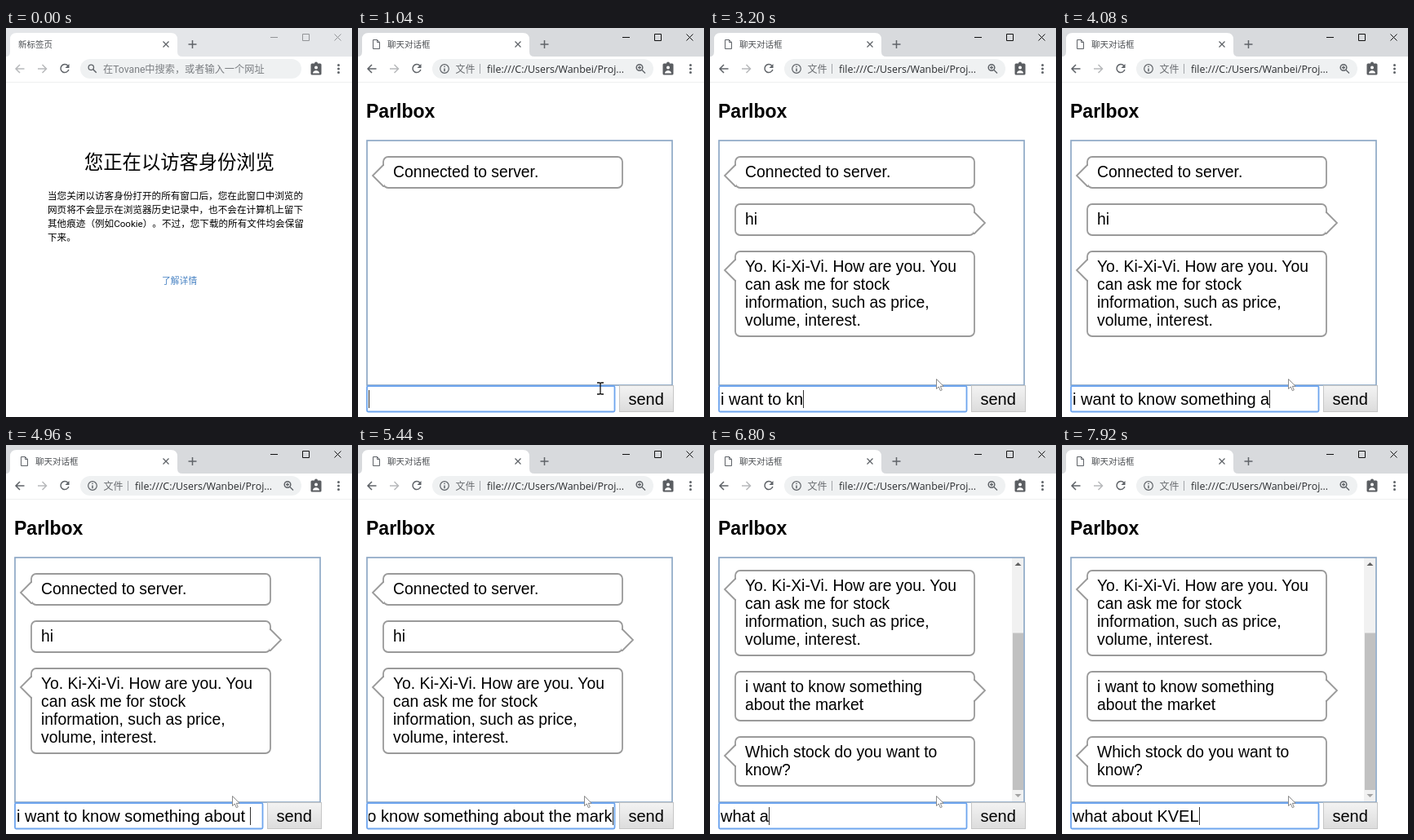
An HTML page for the animation above (8000 ms loop, 424x477 px).

```html
<!DOCTYPE html>
<html lang="zh-CN">
<head>
<meta charset="utf-8">
<title>聊天对话框</title>
<style>
html, body { margin: 0; width: 100%; height: 100%; overflow: hidden; background: #fff; }
svg { position: absolute; left: 0; top: 0; display: block; }
text { white-space: pre; text-spacing-trim: space-all; }
.cjk { font-family: Roboto, "Noto Sans CJK SC", "Noto Sans CJK", sans-serif; }
.arial { font-family: "Liberation Sans", Arial, sans-serif; }
.line { fill: none; stroke: #5f6368; stroke-width: 1.5; }
.off { opacity: .45; }
.bubble rect, .bubble path { fill: #fff; stroke: #9a9a9a; stroke-width: 1.8; }
.bubble text { font-size: 19.33px; }
#field {
  position: absolute; left: 13px; top: 444px; width: 300px; height: 23px;
  overflow: hidden; white-space: pre; font-size: 20px; line-height: 23px; color: #000;
}
#caret { display: inline-block; width: 1px; height: 22px; margin-right: -1px; background: #333; vertical-align: top; }
</style>
</head>
<body>
<svg width="424" height="477" viewBox="0 0 424 477">
  <defs>
    <linearGradient id="face" x2="0" y2="1">
      <stop stop-color="#f3f3f3"/><stop offset="1" stop-color="#dcdcdc"/>
    </linearGradient>
    <clipPath id="view"><rect x="12" y="139" width="372" height="298"/></clipPath>
  </defs>

  <!-- window frame -->
  <rect id="bar" width="424" height="35"/>
  <path d="M0 35Q5 35 5 29V14Q5 6 13 6H202Q210 6 210 14V29Q210 35 216 35Z" fill="#fff"/>
  <path class="line" d="M192.5 16.5l7 7m0-7l-7 7" style="stroke-width:1.3"/>
  <path class="line" d="M223.5 20h10m-5-5v10"/>
  <path id="buttons" d="M324 11.5h9M363.5 7.5h8v8h-8zM402.5 7.5l8 8m0-8l-8 8" fill="none"/>
  <path d="M0 66.5H424" stroke="#eeeff0"/>
  <path id="back" class="line" d="M22.5 50H12m5-5l-5 5l5 5"/>
  <path class="line off" d="M39 50h10.5m-5-5l5 5l-5 5"/>
  <path class="line" d="M75.8 46.3A5 5 0 1 0 76.8 51"/>
  <path d="M77.5 44v5h-5z" fill="#5f6368"/>
  <rect x="91" y="38" width="271" height="24" rx="12" fill="#eff1f2"/>
  <path d="M375 43.5h3a2 2 0 0 1 4 0h3q1.5 0 1.5 1.5v11q0 1.5-1.5 1.5h-10q-1.5 0-1.5-1.5v-11q0-1.500 1.5-1.5z" fill="#5a5d61"/>
  <circle cx="380" cy="48.5" r="2" fill="#fff"/>
  <path d="M376 55.5v-1q1-2.5 4-2.5t4 2.5v1z" fill="#fff"/>
  <g fill="#5f6368"><circle cx="407.5" cy="45.5" r="1.5"/><circle cx="407.5" cy="50" r="1.5"/><circle cx="407.5" cy="54.5" r="1.5"/></g>

  <!-- guest page -->
  <g id="guest" class="cjk">
    <text x="15" y="24" font-size="10.5" fill="#4d5054">新标签页</text>
    <circle class="line" cx="104.3" cy="48.3" r="3.2" style="stroke-width:1.3"/>
    <path class="line" d="M106.7 50.7l4 4"/>
    <text x="119" y="54.5" font-size="12.2" fill="#7b7e82">在Tovane中搜索，或者输入一个网址</text>
    <text x="96" y="172.8" font-size="23.3">您正在以访客身份浏览</text>
    <g font-size="11.6">
      <text x="51" y="209.5">当您关闭以访客身份打开的所有窗口后，您在此窗口中浏览的</text>
      <text x="51" y="226.8">网页将不会显示在浏览器历史记录中，也不会在计算机上留下</text>
      <text x="51" y="244">其他痕迹（例如Cookie）。不过，您下载的所有文件均会保留</text>
      <text x="51" y="261.2">下来。</text>
    </g>
    <text x="191" y="314" font-size="10.8" fill="#4a84c4">了解详情</text>
  </g>

  <!-- chat page -->
  <g id="chat" class="arial">
    <path d="M18.5 14.5h5l3 3v8h-8zM23.5 14.5v3h3" fill="#fff" stroke="#5f6368"/>
    <text class="cjk" x="36" y="24" font-size="10.5" fill="#4d5054">聊天对话框</text>
    <circle class="line" cx="106" cy="50" r="5.3" style="stroke-width:1.2"/>
    <path class="line" d="M106 46.7v1.4m0 1.3v3.8"/>
    <text class="cjk" x="119.5" y="54.5" font-size="12" fill="#6a6d71">文件</text>
    <path d="M149.5 44v12" stroke="#a4a7ab"/>
    <text x="158" y="54.5" font-size="12.4" fill="#2b2d30" style="font-family:'Open Sans',sans-serif">file:///C:/Users/Wanbei/Proj...</text>
    <circle class="line" cx="345" cy="48.5" r="3.8"/>
    <path class="line" d="M348 51.5l4 4M343 48.5h4m-2-2v4" style="stroke-width:1.3"/>

    <text x="10" y="110" font-size="23" font-weight="bold">Parlbox</text>
    <rect x="11" y="138" width="374" height="300" fill="#fff" stroke="#8ea8c6" stroke-width="1.7"/>
    <g clip-path="url(#view)">
      <g id="log"></g>
      <g id="scroll">
        <rect x="370" y="139" width="14" height="298" fill="#f1f1f1"/>
        <rect id="thumb" x="371" width="13" fill="#c1c1c1"/>
        <path d="M373.5 148h8l-4-4z" fill="#606060"/>
        <path d="M373.5 428h8l-4 4z" fill="#a3a3a3"/>
      </g>
    </g>
    <rect x="11" y="439" width="303.5" height="31.5" rx="1.5" fill="#fff" stroke="#6ea5ee" stroke-width="1.8"/>
    <rect x="320.5" y="438.5" width="66" height="32" fill="url(#face)" stroke="#c6c6c6"/>
    <text x="331.5" y="462" font-size="20">send</text>
  </g>
</svg>

<div id="field" class="arial"><span id="typed"></span><span id="caret"></span></div>

<svg width="424" height="477" viewBox="0 0 424 477">
  <path id="beam" d="M-4-7h3l1 1l1-1h3M0-6V6M-4 7h3l1-1l1 1h3" fill="none" stroke="#111" stroke-width="1.3"/>
  <path id="arrow" d="M.5.5v12l2.8-2.5l2 4.7l2-.9l-2-4.5h3.9z" fill="#fff" stroke="#8a8a8a"/>
</svg>

<script>
const LOOP = 8000, STEP = 80, START = 1040;
const VIEW_BOTTOM = 437, VIEW_HEIGHT = 298, TRACK_TOP = 153, TRACK = 270;
const $ = id => document.getElementById(id);
const show = (id, on) => $(id).style.display = on ? "" : "none";

const messages = [
  { at: START, lines: ["Connected to server."] },
  { at: 1840, mine: true, lines: ["hi"] },
  { at: 1920, lines: ["Yo. Ki-Xi-Vi. How are you. You", "can ask me for stock", "information, such as price,", "volume, interest."] },
  { at: 5600, mine: true, lines: ["i want to know something", "about the market"] },
  { at: 5680, lines: ["Which stock do you want to", "know?"] }
];

// keys: [time, characters typed]
const inputs = [
  { text: "hi", end: 1840, keys: [[1520, 0], [1680, 2]] },
  { text: "i want to know something about the market", end: 5600,
    keys: [[2400, 0], [2480, 1], [3200, 12], [3280, 13], [4160, 28], [4320, 30], [4480, 31], [4960, 31], [5520, 41]] },
  { text: "what about KVEL", end: LOOP,
    keys: [[6400, 0], [6480, 1], [6800, 6], [6960, 7], [7120, 8], [7360, 11], [7600, 11], [7920, 15]] }
];
const caretOff = [[2160, 2320], [6160, 6320], [7520, 7680]];

let nextTop = 157;
for (const m of messages) {
  const top = nextTop, height = m.lines.length * 22 + 18;
  const x = m.mine ? 324 : 31, dx = m.mine ? 13 : -13;
  const rows = m.lines.map((s, i) => `<text x="43" y="${top + 26 + i * 22}">${s}</text>`).join("");
  $("log").insertAdjacentHTML("beforeend", `<g class="bubble">
    <rect x="31" y="${top + 1}" width="293" height="${height - 2}" rx="6"/>
    <path d="M${x} ${top + 11}l${dx} 13l${-dx} 13" style="stroke:none"/>
    <path d="M${x - dx / 13} ${top + 11}h${dx / 13}l${dx} 13l${-dx} 13h${-dx / 13}"/>${rows}</g>`);
  m.node = $("log").lastElementChild;
  m.bottom = top + height;
  nextTop = m.bottom + 18;
}

function track(keys, t) {
  if (t <= keys[0][0]) return keys[0][1];
  for (let i = 1; i < keys.length; i++) {
    const [t0, a] = keys[i - 1], [t1, b] = keys[i];
    if (t < t1) return a + (b - a) * (t - t0) / (t1 - t0);
  }
  return keys[keys.length - 1][1];
}

function drawLog(t) {
  let bottom = 0;
  for (const m of messages) {
    const on = t >= m.at;
    m.node.style.display = on ? "" : "none";
    if (on) bottom = m.bottom + 18;
  }
  const offset = Math.max(0, bottom - VIEW_BOTTOM);
  const size = TRACK * VIEW_HEIGHT / (VIEW_HEIGHT + offset);
  $("log").setAttribute("transform", `translate(0 ${-offset})`);
  $("thumb").setAttribute("height", size);
  $("thumb").setAttribute("y", TRACK_TOP + TRACK - size);
  show("scroll", offset > 0);
}

function drawField(t) {
  const input = inputs.find(i => t < i.end);
  $("typed").textContent = input.text.slice(0, Math.floor(track(input.keys, t) + 0.001));
  $("caret").style.visibility = caretOff.some(([a, b]) => t >= a && t < b) ? "hidden" : "visible";
  $("field").scrollLeft = 9999;
}

function drawPointer(t) {
  const x = track([[START, 297], [1360, 277]], t), y = track([[START, 442], [1360, 430]], t);
  const overField = y > 437;
  show("beam", overField);
  show("arrow", !overField);
  $(overField ? "beam" : "arrow").setAttribute("transform", `translate(${x} ${y})`);
}

function draw(now) {
  const t = Math.floor(now % LOOP / STEP) * STEP, chat = t >= START;
  show("guest", !chat);
  for (const id of ["chat", "field"]) show(id, chat);
  $("bar").setAttribute("fill", chat ? "#d8dadd" : "#e4e6e9");
  $("buttons").setAttribute("stroke", chat ? "#111" : "#929497");
  $("back").classList.toggle("off", !chat);
  if (chat) {
    drawLog(t);
    drawField(t);
    drawPointer(t);
  } else {
    show("beam", false);
    show("arrow", false);
  }
}

const begin = performance.now();
function tick() {
  draw(performance.now() - begin);
  requestAnimationFrame(tick);
}
tick();
</script>
</body>
</html>
```
